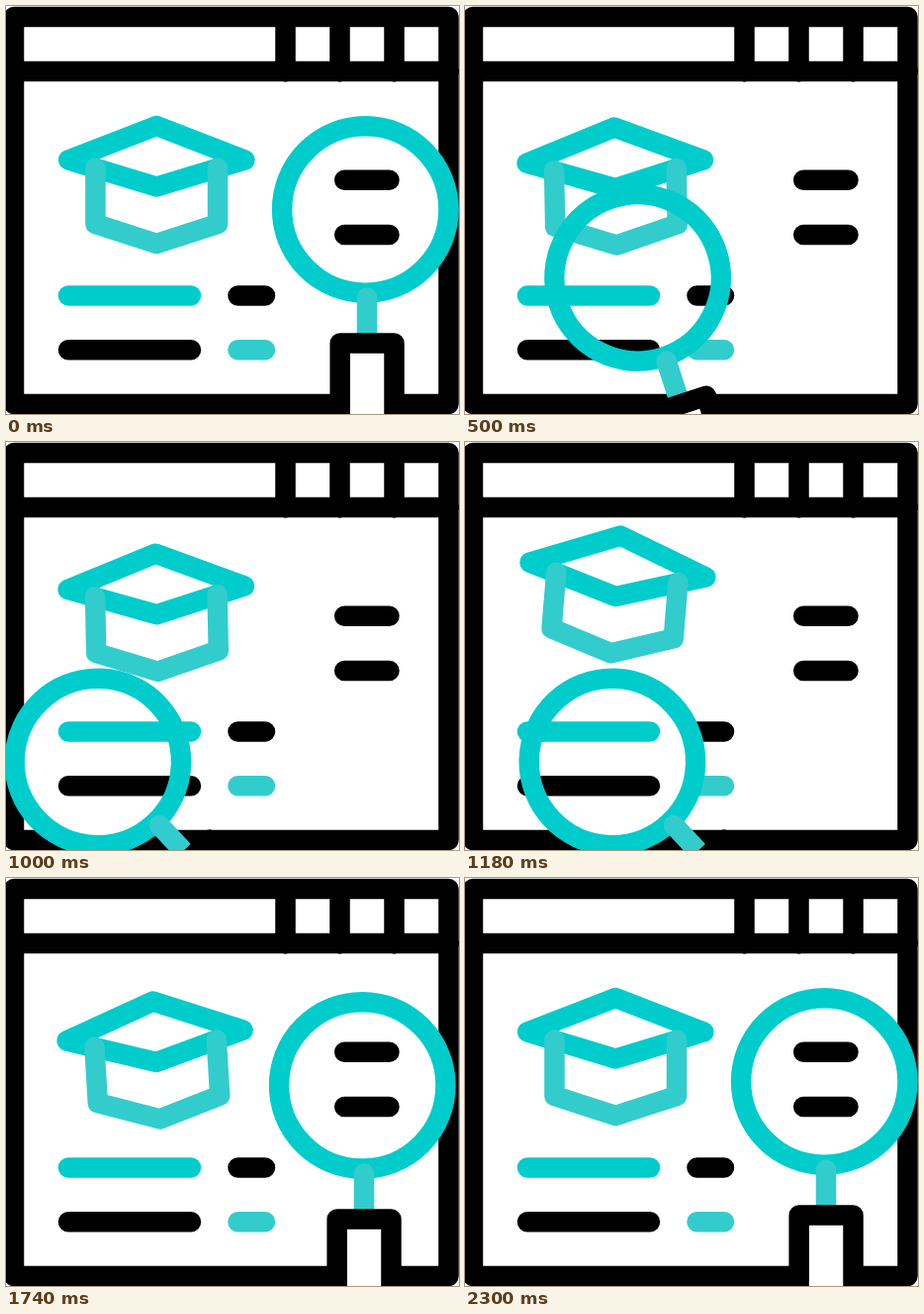
An HTML page for the animation above (2400 ms loop, 458 by 412 pixels).

```html
<!DOCTYPE html>
<html lang="en">
<head>
<meta charset="utf-8">
<title>Course search</title>
<style>
  html, body { margin: 0; width: 100%; height: 100%; overflow: hidden; background: #fff; }
  svg { display: block; width: 458px; height: 412px; }
  .line { fill: none; stroke-width: 20.5; stroke-linecap: round; stroke-linejoin: round; }
  .black { stroke: #000; }
  .teal { stroke: #00cccc; }
  .soft { stroke: #33cccc; }
  .white { fill: #fff; }
</style>
</head>
<body>
<svg viewBox="0 0 458 412">
  <path class="line black" d="M8 11H447.5V402H8ZM8 66H448M282.5 11V66.6M337.5 11V66.6M392.5 11V66.6"/>
  <circle id="lens" class="white" r="84.2"/>
  <path class="line teal" d="M63 292.5H187"/>
  <path class="line black" d="M63 347.2H187M234.5 292.5H262M342.2 175.7H387.5M342.2 230.9H387.5"/>
  <path class="line soft" d="M234.5 347.2H262"/>
  <g id="cap">
    <path class="line teal" d="M0 0L-89.2 -27L0 -61.5L89.2 -27Z"/>
    <path class="line soft" d="M-61.8 -19V37.5L0 57.5L61.8 37.5V-19"/>
  </g>
  <g id="glass">
    <circle class="line teal" r="84.2"/>
    <path class="line soft" d="M1.7 89V135"/>
    <path class="line black" style="fill:#fff" d="M-25.6 260V135H29.2V260"/>
  </g>
</svg>
<script>
const LOOP = 2400;
const SWING = 400;
const [lens, cap, glass] = ['lens', 'cap', 'glass'].map(id => document.getElementById(id));

// Sine ease from 0 to 1 between two times.
function ease(t, from, to) {
  const u = Math.min(1, Math.max(0, (t - from) / (to - from)));
  return (1 - Math.cos(Math.PI * u)) / 2;
}

// The cap eases from one pose to the next on every swing.
function swing(t, poses) {
  return poses.reduce((value, pose, i) =>
    value + (pose - value) * ease(t, i * SWING, (i + 1) * SWING), 0);
}

const place = (node, x, y, turn) =>
  node.setAttribute('transform', `translate(${x} ${y}) rotate(${turn})`);

function draw(t) {
  // The glass sweeps to the lower left, then slides right before it rises.
  const x = 363.3 - 282.3 * (ease(t, 200, 694) - ease(t, 880, 1802));
  const y = 205.5 + 117.5 * (ease(t, 200, 742) - ease(t, 1324, 1796));
  const turn = -43.1 * (ease(t, 260, 800) - ease(t, 1380, 1720));
  place(lens, x, y, 0);
  place(glass, x, y, turn);

  const shift = swing(t, [0, 10.5, -26.8, 4.8, 0]);
  const tilt = swing(t, [0, -7.2, 4.8, -4.8, 0]);
  place(cap, 152.25, 182.5 + shift, tilt);
}

const start = performance.now();
function tick() {
  draw((performance.now() - start) % LOOP);
  requestAnimationFrame(tick);
}
tick();
</script>
</body>
</html>
```
